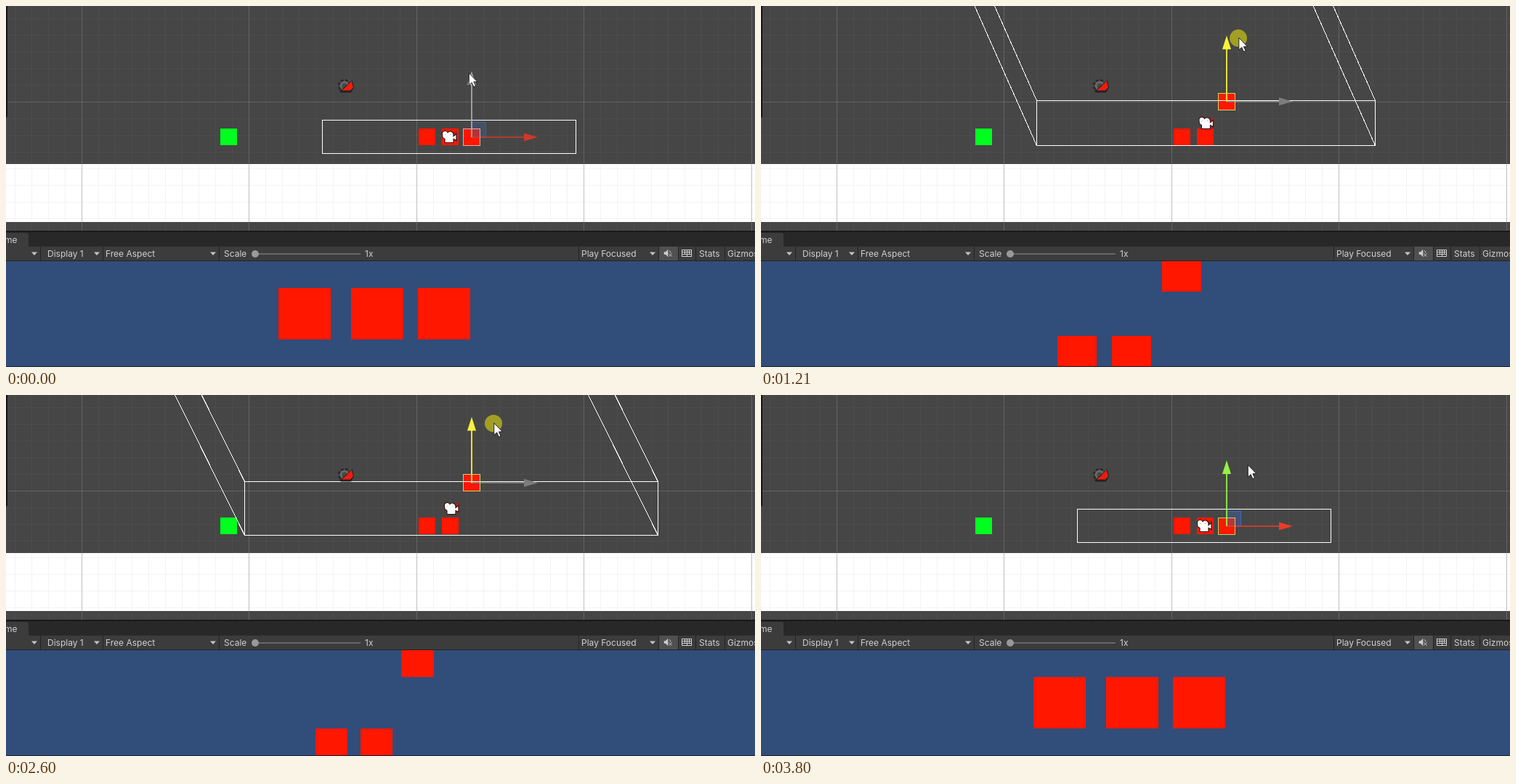
Recreate the animation shown at these times as an HTML page. Size 1031 by 498 pixels, loop 3.9 s.

```html
<!DOCTYPE html>
<html lang="en">
<head>
<meta charset="utf-8">
<title>Group framing camera</title>
<style>
  html, body { margin: 0; width: 100%; height: 100%; overflow: hidden; background: #464646; }
  svg { display: block; width: 100%; height: 100%; }
  text { font: 12px Inter, Roboto, sans-serif; fill: #d0d0d0; }
  .crisp { shape-rendering: crispEdges; }
</style>
</head>
<body>
<svg viewBox="0 0 1031 498">
  <defs>
    <clipPath id="sceneClip"><rect width="1031" height="310"/></clipPath>
    <clipPath id="gameClip"><rect y="352" width="1031" height="145"/></clipPath>
  </defs>

  <g clip-path="url(#sceneClip)">
    <rect width="1031" height="310" fill="#464646"/>
    <rect class="crisp" y="218" width="1031" height="80" fill="#fff"/>
    <g id="grid" class="crisp" stroke="#808080"></g>
    <g class="crisp">
      <rect x="295" y="169" width="23" height="23" fill="#00ff1e"/>
      <rect x="568" y="169" width="23" height="23" fill="#ff1700"/>
      <rect x="600" y="169" width="23" height="23" fill="#ff1700"/>
    </g>
    <rect id="player" class="crisp" x="629.5" width="23" height="23" fill="#ff1700"/>
    <path id="frustum" class="crisp" fill="none" stroke="#fff"/>
    <g>
      <circle cx="466" cy="110" r="6.5" fill="none" stroke="#262626" stroke-width="5" stroke-dasharray="3.2 1.9"/>
      <circle cx="466" cy="110" r="5" fill="none" stroke="#696969" stroke-width="3"/>
      <path d="M459 117.5 468 110 476.5 102.5 479 112 475 119.5H461Z" fill="#222"/>
      <path d="M462 116.5 469 110.5 475.5 103.5 478 112 474 116.5Z" fill="#f01c0c"/>
    </g>
    <g id="camIcon">
      <path d="M6-6 11-8V7L7 5Z" fill="#a8231a"/>
      <path d="M-9.5-3.5A4 4 0 0 1-2-6 4.6 4.6 0 0 1 6-3V-1L10-4V5L6 3V8H-6V3L-9 1Z" fill="#fff" stroke="#3a1512" stroke-width="1.2"/>
      <path d="M-6-3h1.5M1-3h1.5" stroke="#bbb"/>
    </g>
    <g id="gizmo">
      <rect id="plane" x="641.5" y="-20.5" width="19" height="20"/>
      <g id="axisX"><path d="M641 0H714" stroke-width="1.6"/><path d="M713-5.5 732 0 713 5.5Z" stroke="none"/></g>
      <g id="axisY"><path d="M641 0V-73" stroke-width="1.8"/><path d="M635-72 641-91 647-72Z" stroke="none"/></g>
      <rect id="outline" class="crisp" x="629.5" y="-11.5" width="23" height="23" fill="none"/>
    </g>
    <path d="M0 0H2V152L0 155Z" fill="#151515"/>
    <g id="cursor">
      <circle id="press" r="12" fill="#d2cd14" fill-opacity=".66"/>
      <path d="M.8-.5V16.2L4.7 12.6 7.3 18.6 10 17.4 7.4 11.6H12.4Z" fill="#fff" stroke="#111" stroke-width=".9"/>
    </g>
  </g>

  <g class="crisp">
    <rect y="310" width="1031" height="21" fill="#282828"/>
    <rect y="310" width="1031" height="2" fill="#191919"/>
    <rect y="331" width="1031" height="21" fill="#3c3c3c"/>
    <rect y="331" width="1031" height="1" fill="#2c2c2c"/>
    <rect x="899" y="332" width="26" height="19" fill="#505050"/>
    <rect y="351" width="1031" height="1" fill="#232323"/>
  </g>
  <path d="M0 313H28Q31 313 31 316V332H0Z" fill="#3c3c3c"/>
  <g id="bar"></g>
  <path d="M343 342H488" stroke="#686868" stroke-width="2"/>
  <circle cx="343" cy="342" r="5" fill="#999"/>
  <g fill="none" stroke="#cfcfcf">
    <path d="M906 339.5h2l3-3v9l-3-3h-2z" fill="#cfcfcf" stroke-width=".6"/>
    <path d="M913 337.5q2 1 2 3M912.5 341.5l4 4m0-4-4 4"/>
    <rect x="930.5" y="336.5" width="13" height="9"/>
    <path d="M930.5 339.5h13M930.5 342.5h13M934.5 336.5v6M937.5 336.5v9M940.5 336.5v6"/>
  </g>

  <rect y="352" width="1031" height="146" fill="#314d79"/>
  <g id="game" class="crisp" clip-path="url(#gameClip)"></g>
  <rect class="crisp" y="497" width="1031" height="1" fill="#1c2433"/>
</svg>

<script>
const LOOP = 3900;
const $ = id => document.getElementById(id);
const set = (el, attrs) => { for (const k in attrs) el.setAttribute(k, attrs[k]); return el; };
const add = (parent, tag, attrs) =>
  parent.appendChild(set(document.createElementNS('http://www.w3.org/2000/svg', tag), attrs));

// Scene grid
function gridLines(origin, end, path) {
  for (let i = -10; i < 50; i++) {
    const p = Math.floor(origin + i * 23.05) + 0.5;
    if (p > 0 && p < end) add($('grid'), 'path', { d: path(p), 'stroke-opacity': i % 10 ? 0.09 : 0.5 });
  }
}
gridLines(104.3, 1031, x => `M${x} 0V310`);
gridLines(132.3, 310, y => `M0 ${y}H1031`);

// Game toolbar
const labels = [['me', -2, 327], ['Display 1', 57], ['Free Aspect', 137], ['Scale', 300],
  ['1x', 494], ['Play Focused', 792], ['Stats', 954], ['Gizmos', 993]];
for (const [s, x, y = 346] of labels) add($('bar'), 'text', { x, y }).textContent = s;
for (const x of [47, 133, 293, 788, 898, 925, 949, 989])
  add($('bar'), 'path', { d: `M${x + 0.5} 332V351`, stroke: '#232323' });
for (const x of [39, 125, 285, 890])
  add($('bar'), 'path', { d: `M${x - 4} 339.5h8l-4 4.5z`, fill: '#c4c4c4' });

const gameBoxes = [[306.5, '#00ff1e'], [579.5, '#ff1700'], [611.5, '#ff1700'], [641, '#ff1700']]
  .map(([x, fill]) => ({ x, el: add($('game'), 'rect', { fill }) }));

// Monotone cubic through [t, value] keys
function curve(keys) {
  const slope = i => (keys[i + 1][1] - keys[i][1]) / (keys[i + 1][0] - keys[i][0]);
  const tangent = keys.map((_, i) => {
    if (!i || i === keys.length - 1) return 0;
    const a = slope(i - 1), b = slope(i);
    return a * b > 0 ? 2 * a * b / (a + b) : 0;
  });
  return t => {
    if (t <= keys[0][0]) return keys[0][1];
    const i = keys.findIndex(k => k[0] > t) - 1;
    if (i < 0) return keys[keys.length - 1][1];
    const [t0, a] = keys[i], [t1, b] = keys[i + 1], h = t1 - t0, u = (t - t0) / h;
    return a + (b - a) * u * u * (3 - 2 * u)
      + h * u * (1 - u) * ((1 - u) * tangent[i] - u * tangent[i + 1]);
  };
}
function linear(keys) {
  return t => {
    const i = keys.findIndex(k => k[0] > t);
    if (i === 0) return keys[0][1];
    if (i < 0) return keys[keys.length - 1][1];
    const [t0, a] = keys[i - 1], [t1, b] = keys[i];
    return a + (b - a) * (t - t0) / (t1 - t0);
  };
}

const lift = curve([[800, 0], [1210, 49], [1330, 68.5], [1870, 105], [2220, 105],
  [2600, 60], [2750, 37], [3100, 5], [3230, 5], [3370, 0]]);
const cursorX = curve([[800, 636.5], [1210, 657], [1870, 672], [2020, 673], [2220, 673],
  [2600, 671], [3100, 669], [3370, 669.5]]);
const cursorGap = linear([[30, 88], [70, 85], [800, 85], [1210, 87.5], [1870, 86], [2020, 85],
  [2220, 85], [2600, 82], [3100, 85], [3370, 84]]);
const lean = linear([[0, 0], [5, 0.056], [37, 0.34], [49, 0.443], [60, 0.496], [105, 0.66]]);
const sink = linear([[0, 0], [5, 1.2], [37, 5], [60, 6], [105, 6.5]]);

const looks = {
  hover: { x: '#d03a28', y: '#a9a9a9', edge: '#d8b0a8', plane: '#3f5f96' },
  drag: { x: '#7d7d7d', y: '#f7f23c', edge: '#c8d860', plane: 'none' },
  idle: { x: '#ea3c24', y: '#96f046', edge: '#a8dc60', plane: '#3e68c0' }
};

function drawFrustum(cx, cy, w, d) {
  const h = w * 0.1315, far = 17.8 * d, dx = -lean(d) * far, dy = -far;
  const snap = v => Math.floor(v) + 0.5;
  const corners = [[-1, -1], [1, -1], [1, 1], [-1, 1]]
    .map(([sx, sy]) => [snap(cx + sx * w / 2), snap(cy + sy * h / 2)]);
  const shifted = corners.map(([x, y]) => [x + dx, y + dy]);
  const ring = pts => 'M' + pts.join('L') + 'Z';
  const edges = d > 0.05 ? ring(shifted) + corners.map((p, i) => `M${p}L${shifted[i]}`).join('') : '';
  $('frustum').setAttribute('d', ring(corners) + edges);
}

function render(t) {
  const d = lift(t), py = 181 - d;
  const mid = 180.5 - d / 2, drop = sink(d);
  const cx = 610 + lean(d) * drop, cy = mid + drop;
  const w = Math.max(349.5, 9.5 * d), zoom = 3.13 * 349.5 / w;

  $('player').setAttribute('y', py - 11.5);
  drawFrustum(cx, cy, w, d);
  $('camIcon').setAttribute('transform', `translate(${cx} ${cy})`);

  const look = looks[t < 670 ? 'hover' : t < 3800 ? 'drag' : 'idle'];
  $('gizmo').setAttribute('transform', `translate(0 ${py})`);
  set($('axisX'), { fill: look.x, stroke: look.x });
  set($('axisY'), { fill: look.y, stroke: look.y });
  set($('plane'), { fill: look.plane, 'fill-opacity': 0.35, stroke: look.plane });
  $('outline').setAttribute('stroke', look.edge);

  $('cursor').setAttribute('transform', `translate(${cursorX(t)} ${py - cursorGap(t)})`);
  $('press').setAttribute('visibility', t >= 670 && t < 3770 ? 'visible' : 'hidden');

  const size = 23 * zoom;
  gameBoxes.forEach(({ x, el }, i) => {
    const y = i === 3 ? py - 0.5 : 180.5;
    set(el, {
      x: 508 + (x - 610.6) * zoom - size / 2,
      y: 424.5 + (y - mid) * zoom - size / 2,
      width: size, height: size
    });
  });
}

const start = performance.now();
function tick() {
  render((performance.now() - start) % LOOP);
  requestAnimationFrame(tick);
}
tick();
</script>
</body>
</html>
```
